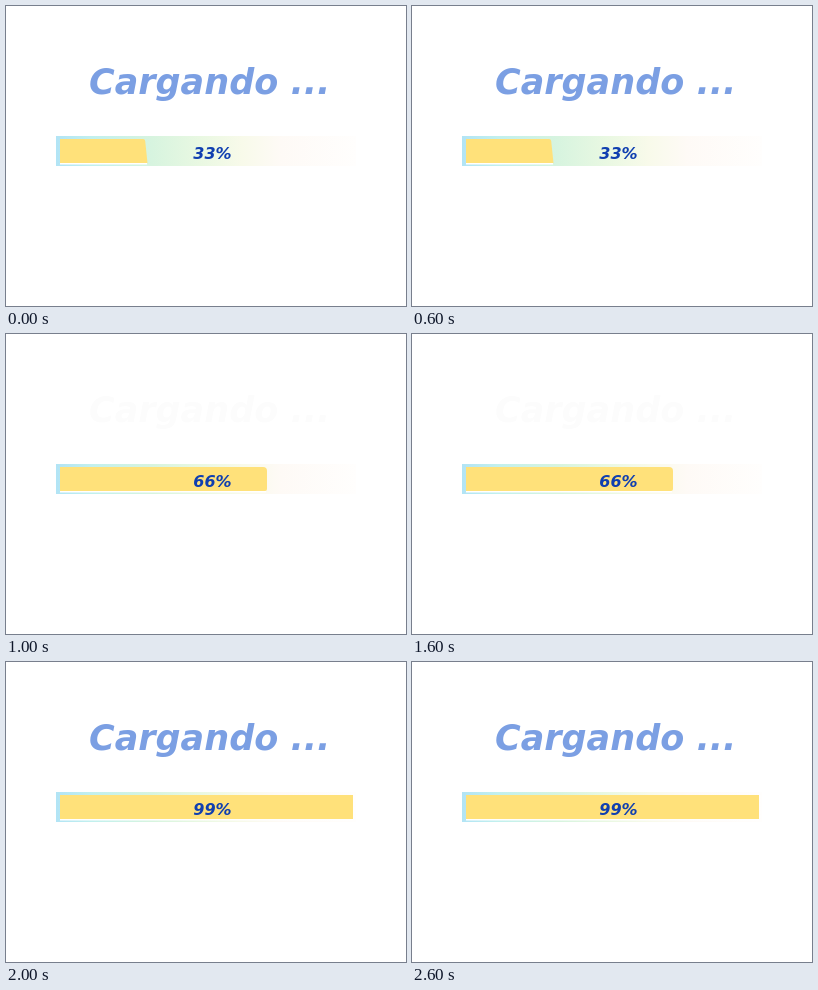
Write an HTML page that moves like this. It is 400 px wide and 300 px high and loops after 3000 ms.

```html
<!DOCTYPE html>
<html lang="es">
<head>
<meta charset="utf-8">
<title>Cargando</title>
<style>
  html, body { margin: 0; width: 100%; height: 100%; overflow: hidden; background: #fff; }
  svg { display: block; width: 400px; height: 300px; }
  text { font-family: "DejaVu Sans", sans-serif; font-weight: bold; font-style: oblique; }
  .title { font-size: 35px; fill: #7b9fe3; animation: blink 3s step-end infinite; }
  .num { font-size: 16px; fill: #103fb0; text-anchor: middle; }
  .fill { fill: #ffe17a; }
  .step { visibility: hidden; animation: show 3s step-end infinite; }
  .s2 { animation-delay: -2s; }
  .s3 { animation-delay: -1s; }
  @keyframes blink {
    0% { fill: #7b9fe3; }
    33.3333% { fill: #fcfcfc; }
    66.6667%, 100% { fill: #7b9fe3; }
  }
  @keyframes show {
    0% { visibility: visible; }
    33.3333%, 100% { visibility: hidden; }
  }
</style>
</head>
<body>
<svg viewBox="0 0 400 300">
  <defs>
    <linearGradient id="track">
      <stop offset="0" stop-color="#b2e4f5"/>
      <stop offset=".12" stop-color="#c2f0ee"/>
      <stop offset=".32" stop-color="#d7f4df"/>
      <stop offset=".48" stop-color="#e9f8e2"/>
      <stop offset=".62" stop-color="#f8faea"/>
      <stop offset=".75" stop-color="#fefaf6"/>
      <stop offset="1" stop-color="#fffefd"/>
    </linearGradient>
  </defs>
  <text class="title" x="83" y="88">Cargando ...</text>
  <rect x="50" y="130" width="300" height="30" fill="url(#track)"/>
  <g class="step">
    <path fill="#fff" d="M54 157H141V158.5H54Z"/>
    <path class="fill" d="M54 133H137Q139 133 139.2 135L141.5 157H54Z"/>
    <text class="num" x="206.5" y="152.5">33%</text>
  </g>
  <g class="step s2">
    <path fill="#fff" d="M54 157H260V158.5H54Z"/>
    <path class="fill" d="M54 133H257Q261 133 261 137V155Q261 157 259 157H54Z"/>
    <text class="num" x="206.5" y="152.5">66%</text>
  </g>
  <g class="step s3">
    <path fill="#fff" d="M54 157H347V158.5H54Z"/>
    <path class="fill" d="M54 133H347V157H54Z"/>
    <text class="num" x="206.5" y="152.5">99%</text>
  </g>
</svg>
</body>
</html>
```
